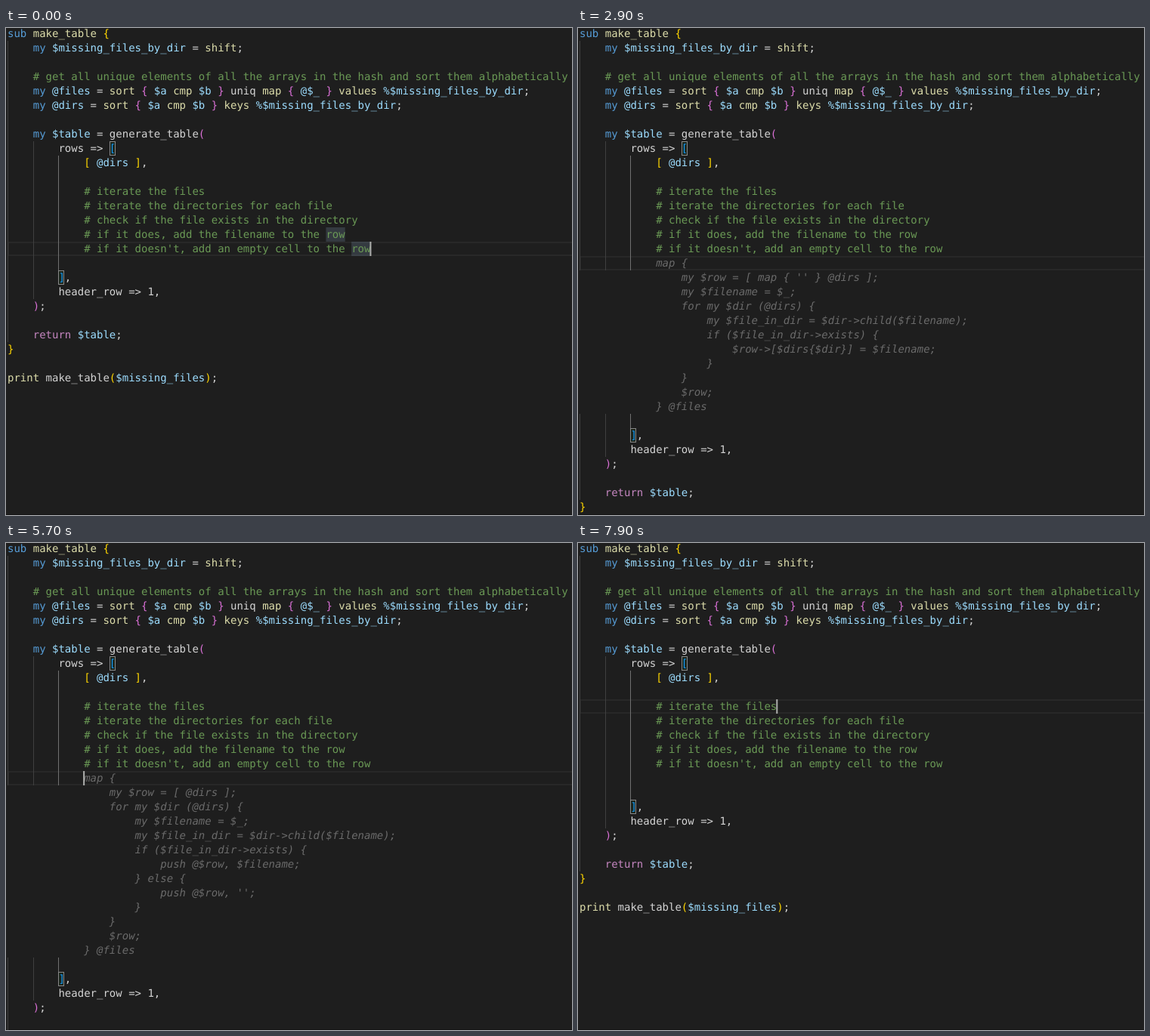
An HTML page with a canvas for the animation above (8000 ms loop, 749 by 645 pixels).

```html
<!DOCTYPE html>
<html lang="en">
<head>
<meta charset="utf-8">
<title>Code completion</title>
<style>
html, body { margin: 0; width: 100%; height: 100%; overflow: hidden; background: #1e1e1e; }
canvas { display: block; }
</style>
</head>
<body>
<canvas id="stage" width="749" height="645"></canvas>
<script>
const ctx = document.getElementById('stage').getContext('2d');
const W = 749, H = 645, LOOP = 8000;
const LEFT = 2, LINE = 19, CHAR = 14 * 1233 / 2048;
const FONT = '14px "DejaVu Sans Mono", monospace';

const HEAD = `sub make_table {
    my $missing_files_by_dir = shift;

    # get all unique elements of all the arrays in the hash and sort them alphabetically
    my @files = sort { $a cmp $b } uniq map { @$_ } values %$missing_files_by_dir;
    my @dirs = sort { $a cmp $b } keys %$missing_files_by_dir;

    my $table = generate_table(
        rows => [
            [ @dirs ],

            # iterate the files
            # iterate the directories for each file
            # check if the file exists in the directory
            # if it does, add the filename to the row
            # if it doesn't, add an empty cell to the row`.split('\n');

const TAIL = `
        ],
        header_row => 1,
    );

    return $table;
}

print make_table($missing_files);`.split('\n');

const GHOSTS = [`map {
    my $row = [ map { '' } @dirs ];
    my $filename = $_;
    for my $dir (@dirs) {
        my $file_in_dir = $dir->child($filename);
        if ($file_in_dir->exists) {
            $row->[$dirs{$dir}] = $filename;
        }
    }
    $row;
} @files`, `map {
    my @row;
    for my $dir (@dirs) {
        my $filename = $_;
        my $file_in_dir = $dir->child($filename);
        if ($file_in_dir->exists) {
            push @row, $filename;
        }
        else {
            push @row, '';
        }
    }
    \\@row;
} @files`, `map {
    my $row = [ @dirs ];
    for my $dir (@dirs) {
        my $filename = $_;
        my $file_in_dir = $dir->child($filename);
        if ($file_in_dir->exists) {
            push @$row, $filename;
        } else {
            push @$row, '';
        }
    }
    $row;
} @files`].map(s => s.split('\n'));

// Each step: start time and the properties that change
const STEPS = [
  [0, { row: 15, col: 57, on: true, ghost: -1, extra: 0 }],
  [400, { on: false }],
  [900, { on: true }],
  [1200, { row: 16, col: 12, extra: 1 }],
  [1400, { ghost: 0 }],
  [1700, { on: false }],
  [2300, { on: true }],
  [2900, { on: false }],
  [3400, { on: true }],
  [3900, { on: false }],
  [4300, { ghost: 1 }],
  [4400, { on: true }],
  [4900, { on: false }],
  [5400, { on: true }],
  [5700, { ghost: 2 }],
  [5800, { on: false }],
  [6400, { on: true }],
  [6900, { on: false }],
  [7000, { row: 15, on: true, ghost: -1 }],
  [7100, { row: 13 }],
  [7300, { row: 12 }],
  [7600, { row: 11 }],
  [7900, { col: 31 }]
];

const COLORS = { sub: '#569cd6', my: '#569cd6', return: '#c586c0' };
for (const f of ['shift', 'sort', 'cmp', 'map', 'values', 'keys', 'print']) COLORS[f] = '#dcdcaa';
const BRACKETS = ['#ffd700', '#da70d6', '#179fff'];

const xOf = col => LEFT + col * CHAR;
const topOf = row => row * LINE - 2;

function tokenize(lines) {
  let depth = 0;
  return lines.map(line => {
    let prev = '';
    return [...line.matchAll(/#.*|[$@%]+\w+|\w+|[()[\]{}]|[^\s\w()[\]{}]+/g)].map(m => {
      const text = m[0], c = text[0];
      let color = COLORS[text] || '#d4d4d4';
      if (c === '#') color = '#6a9955';
      else if ('$@%'.includes(c)) color = '#9cdcfe';
      else if ('([{'.includes(c)) color = BRACKETS[depth++ % 3];
      else if (')]}'.includes(c)) color = BRACKETS[--depth % 3];
      else if (prev === 'sub') color = '#dcdcaa';
      prev = text;
      return { text, color, col: m.index };
    });
  });
}

const CODE = tokenize([...HEAD, ...TAIL]);

function rect(x, y, w, h, color) {
  ctx.fillStyle = color;
  ctx.fillRect(x, y, w, h);
}

function print(text, col, row, color) {
  ctx.fillStyle = color;
  ctx.fillText(text, xOf(col), topOf(row) + 14);
}

function guide(col, from, to, color) {
  rect(Math.round(xOf(col)), topOf(from), 1, (to - from) * LINE, color);
}

function bracketBox(col, row) {
  const x = Math.round(xOf(col)), y = topOf(row);
  rect(x, y, 8, LINE, 'rgba(0,100,0,0.1)');
  ctx.strokeStyle = '#888888';
  ctx.lineWidth = 1;
  ctx.strokeRect(x + 0.5, y + 0.5, 7, LINE - 1);
}

function stateAt(t) {
  const state = {};
  for (const [start, change] of STEPS) if (t >= start) Object.assign(state, change);
  return state;
}

function draw(t) {
  const s = stateAt(t);
  const ghost = GHOSTS[s.ghost];
  const split = HEAD.length;
  const shift = s.extra + (ghost ? ghost.length - 1 : 0);

  rect(0, 0, W, H, '#1e1e1e');
  rect(0, H - 1, W, 1, '#141414');

  ctx.strokeStyle = '#282828';
  ctx.lineWidth = 2;
  ctx.strokeRect(LEFT + 1, topOf(s.row) + 1, W, LINE - 2);

  if (!s.extra) {
    for (const [col, row] of [[50, 14], [54, 15]]) {
      rect(xOf(col), topOf(row), 3 * CHAR, LINE, 'rgba(173,214,255,0.15)');
    }
  }

  // Guides skip the rows taken by the suggestion
  for (const [col, from, to, color] of [[0, 1, 22, '#404040'], [4, 8, 19, '#404040'], [8, 9, 17, '#707070']]) {
    guide(col, from, split + s.extra, color);
    guide(col, split + shift, to + shift, color);
  }

  bracketBox(16, 8);
  bracketBox(8, split + 1 + shift);

  ctx.textRendering = 'geometricPrecision';
  ctx.font = FONT;
  CODE.forEach((tokens, i) => {
    const row = i < split ? i : i + shift;
    for (const k of tokens) print(k.text, k.col, row, k.color);
  });

  if (ghost) {
    ctx.font = 'italic ' + FONT;
    ghost.forEach((line, i) => {
      const text = line.trimStart();
      print(text, 12 + line.length - text.length, split + i, 'rgba(255,255,255,0.34)');
    });
  }

  if (s.on) rect(xOf(s.col) - 1, topOf(s.row), 2, LINE, '#aeafad');
}

const begin = performance.now();
function tick() {
  draw((performance.now() - begin) % LOOP);
  requestAnimationFrame(tick);
}
tick();
</script>
</body>
</html>
```
